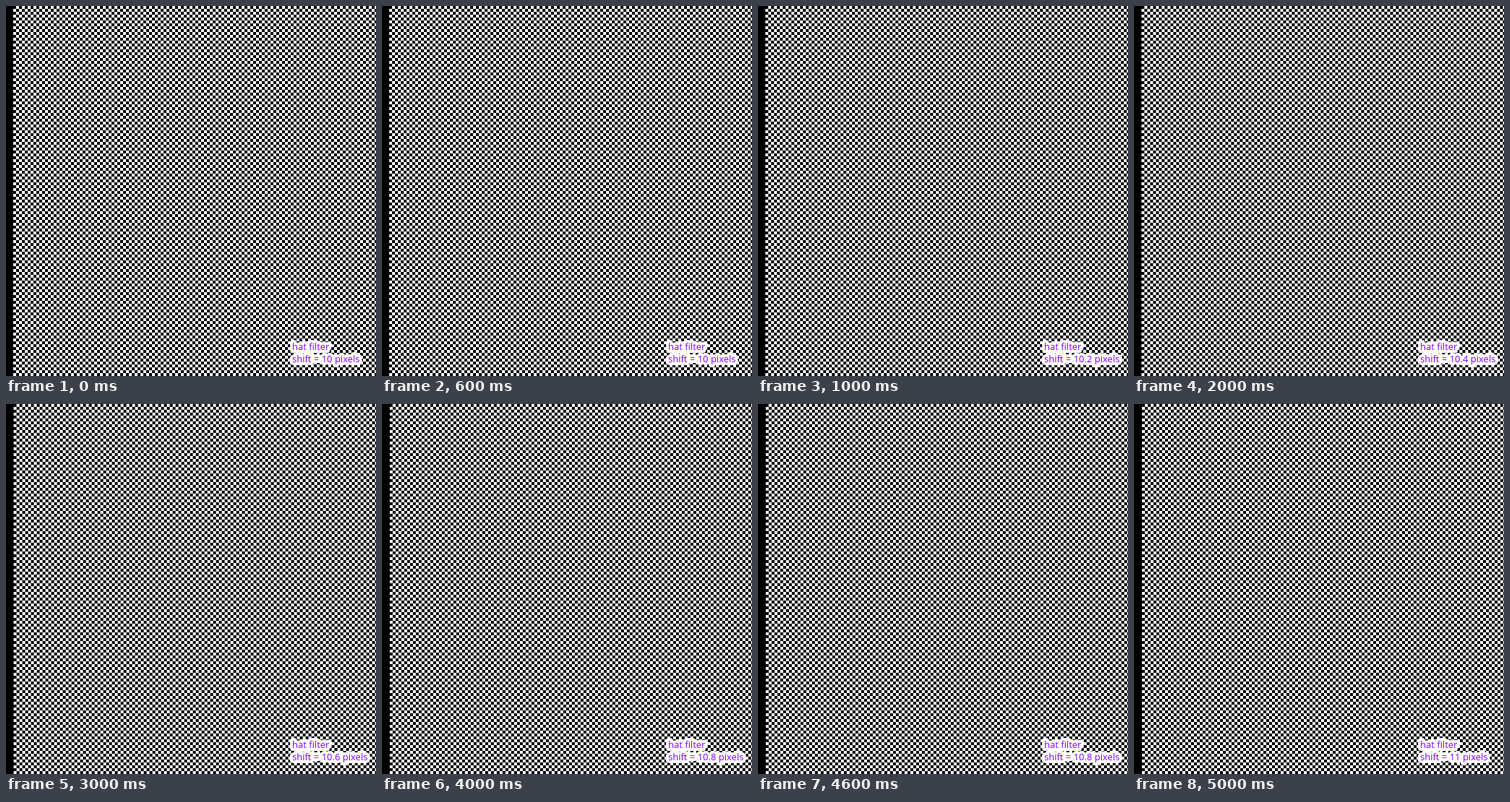
An HTML page for the animation above (6000 ms loop, 512 px wide and 512 px high).

```html
<!DOCTYPE html>
<html lang="en">
<head>
<meta charset="utf-8">
<title>Hat filter shift</title>
<style>
  html, body { margin: 0; width: 100%; height: 100%; overflow: hidden; background: #000; }
  .stage { position: relative; width: 512px; height: 512px; overflow: hidden; background: #000; }
  .board {
    position: absolute; top: 0; left: 10px; right: 0; bottom: 0;
    background: conic-gradient(#fff 25%, #000 0 50%, #fff 0 75%, #000 0) 0 0 / 8px 8px;
  }
  /* The next whole-pixel shift, blended in for the fractional part. */
  .next { border-left: 1px solid #000; opacity: 0; }
  svg { position: absolute; inset: 0; }
  text {
    font: 13px "Open Sans", "Noto Sans", sans-serif;
    fill: #8000ff; stroke: #fff; stroke-width: 8px;
    stroke-linejoin: round; paint-order: stroke;
  }
</style>
</head>
<body>
<div class="stage">
  <div class="board"></div>
  <div class="board next" id="next"></div>
  <svg width="512" height="512" viewBox="0 0 512 512">
    <text x="396" y="476">hat filter</text>
    <text x="396" y="493" id="label">shift = 10 pixels</text>
  </svg>
</div>
<script>
  const next = document.getElementById('next');
  const label = document.getElementById('label');
  const STEPS = 6, STEP_MS = 1000;
  let shown = -1;

  function frame() {
    const step = Math.floor(performance.now() / STEP_MS) % STEPS;
    if (step !== shown) {
      shown = step;
      next.style.opacity = step / (STEPS - 1);
      label.textContent = `shift = ${(100 + 2 * step) / 10} pixels`;
    }
    requestAnimationFrame(frame);
  }
  frame();
</script>
</body>
</html>
```
